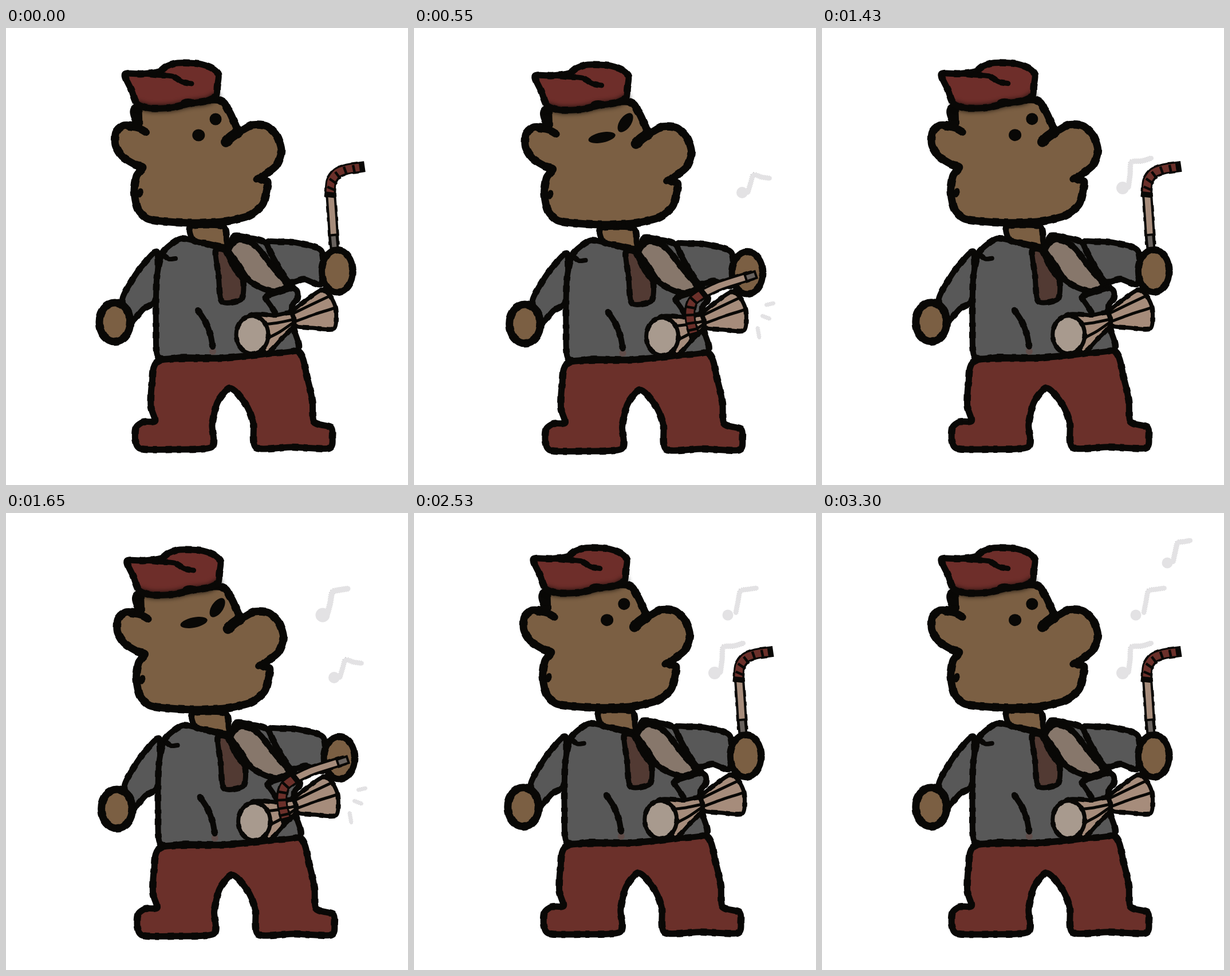
Recreate the animation shown at these times as an HTML page with a canvas. Size 702 px wide and 797 px high, loop 3.85 s.

```html
<!DOCTYPE html>
<html lang="en">
<head>
<meta charset="utf-8">
<title>Drummer</title>
<style>
  html, body { margin: 0; width: 100%; height: 100%; overflow: hidden; background: #fff; }
  canvas { display: block; }
</style>
</head>
<body>
<canvas id="stage" width="702" height="797"></canvas>
<script>
const ctx = document.getElementById('stage').getContext('2d');
const STEP = 550, STEPS = 7;
const INK = '#090806', SKIN = '#7b5f43', SHIRT = '#585858', RED = '#6b302a',
      WOOD = '#a68c7b', HIDE = '#a89a8e', STRAP = '#87776b', TIE = '#523a33', NOTE = '#e3e2e4';

// Smooth curve through "x,y x,y ..." points.
function curve(text, closed = false) {
  const pts = text.split(' ').map(p => p.split(',').map(Number));
  const n = pts.length;
  const at = i => closed ? pts[(i + n) % n] : pts[Math.max(0, Math.min(n - 1, i))];
  const path = new Path2D();
  path.moveTo(...pts[0]);
  for (let i = 0; i < (closed ? n : n - 1); i++) {
    const [a, b, c, d] = [at(i - 1), at(i), at(i + 1), at(i + 2)];
    path.bezierCurveTo(b[0] + (c[0] - a[0]) / 8, b[1] + (c[1] - a[1]) / 8,
                       c[0] - (d[0] - b[0]) / 8, c[1] - (d[1] - b[1]) / 8, c[0], c[1]);
  }
  if (closed) path.closePath();
  return path;
}

function oval(x, y, rx, ry, turn = 0) {
  const path = new Path2D();
  path.ellipse(x, y, rx, ry, turn, 0, Math.PI * 2);
  return path;
}

function line(path, width, color = INK) {
  ctx.strokeStyle = color;
  ctx.lineWidth = width;
  ctx.stroke(path);
}

// Brush line with slightly uneven edges.
function brush(path, width) {
  line(path, width);
  ctx.save();
  ctx.setLineDash([7, 15, 11, 9]);
  ctx.lineCap = 'butt';
  line(path, width + 1.6);
  ctx.restore();
}

function fill(path, color) {
  ctx.fillStyle = color;
  ctx.fill(path);
}

function shape(path, color, width) {
  fill(path, color);
  brush(path, width);
}

const leftArm = curve('264,392 240,412 220,440 203,474 214,515 240,490 262,472', true);
const leftHand = oval(190, 513, 27, 34);
const pants = curve('268,580 255,620 253,660 260,685 240,687 227,697 226,720 236,734 290,735 359,731 360,692 368,656 380,637 391,628 404,637 422,662 432,690 437,732 500,731 564,733 570,712 567,696 538,687 535,650 526,610 510,564 440,570 375,576', true);
const torso = curve('274,391 303,368 330,371 385,385 398,363 425,366 455,376 475,420 493,447 508,458 509,472 500,485 503,525 509,561 440,569 375,575 310,574 266,574 262,520 262,470 264,430', true);
const neck = curve('323,346 327,370 352,376 384,382 385,370 379,346', true);
const head = curve('230,138 229,168 205,170 192,182 191,204 203,224 225,238 239,243 228,258 224,285 230,315 248,333 285,338 335,340 385,337 425,327 448,308 455,285 457,268 445,262 472,240 481,214 473,188 455,171 430,169 408,180 399,165 388,143 365,125', true);
const hat = curve('208,81 238,80 267,76 280,67 300,61 335,62 358,69 371,81 369,102 367,118 350,127 320,132 288,139 252,140 229,132 219,108', true);
const hatBase = curve('229,134 252,140 288,139 320,132 350,128 368,118');
const rightArm = curve('456,377 480,373 510,375 551,389 551,446 520,438 492,441', true);
const rightHand = oval(578.5, 424, 27, 37);
const strap = curve('394,377 407,369 425,373 442,386 468,420 491,448 472,459 450,455 424,440 405,412 389,389', true);
const tie = curve('366,389 371,430 377,477 411,473 414,441 399,420 383,389', true);
const cone = curve('498,497 525,474 551,457 566,467 576,490 573,524 535,523 503,519', true);
const barrel = curve('425,503 470,501 498,497 503,518 482,541 452,566', true);
const drumHead = oval(430, 535, 28, 33);

const raisedStick = {
  shaft: curve('567,288 570,330 573,378'),
  tip: curve('572,367 573,378'),
  grip: curve('566,286 568,267 578,253 596,246 617,243'),
  bands: ['561,277 575,283', '565,263 578,272', '575,251 584,263', '590,242 595,256', '606,239 609,253']
};
const loweredStick = {
  shaft: curve('499,466 535,449 592,431'),
  tip: curve('585,434 591,432'),
  grip: curve('501,465 487,476 482,493 483,512 488,531'),
  bands: ['483,470 495,481', '475,486 493,489', '473,501 493,500', '475,516 495,513', '478,528 496,524']
};

function drawHead(hit) {
  shape(neck, SKIN, 10);
  shape(head, SKIN, 13);
  brush(curve('230,140 231,168'), 15);
  brush(curve('214,172 232,175 245,182'), 12);
  brush(curve('384,199 393,190 406,181'), 18);
  brush(curve('437,264 450,257 463,249'), 11);
  brush(curve('235,284 233,291'), 9);
  ctx.save();
  fill(hat, '#6e2e2a');
  ctx.shadowColor = INK;
  ctx.shadowBlur = 9;
  line(hatBase, 10);
  ctx.restore();
  brush(hat, 11);
  brush(curve('230,79 262,82 290,84 308,94 324,97'), 9);
  fill(oval(318, 130, 13, 7), INK);
  if (hit) {
    fill(oval(324.5, 188, 24, 9, -0.2), INK);
    fill(oval(365.5, 162, 10, 19, 0.6), INK);
  } else {
    fill(oval(366, 159, 10.5, 10.5), INK);
    fill(oval(336.3, 187, 11, 10.5), INK);
  }
}

function drawBody() {
  shape(leftArm, SHIRT, 10);
  shape(leftHand, SKIN, 13);
  brush(curve('200,478 213,492 216,515'), 11);
  shape(pants, RED, 11);
  shape(torso, SHIRT, 10);
  brush(curve('276,397 285,403 296,402'), 8);
  fill(oval(361, 564, 6, 6), '#604d4a');
  brush(curve('335,492 348,512 357,535 361,556'), 10);
}

function drawDrum() {
  shape(rightArm, SHIRT, 10);
  shape(tie, TIE, 9);
  shape(strap, STRAP, 10);
  brush(curve('455,467 480,459 500,453'), 10);
  brush(curve('452,470 462,484 471,498'), 9);
  shape(cone, WOOD, 7);
  shape(barrel, WOOD, 7);
  for (const rib of ['499,499 530,484 566,467', '502,513 540,499 575,488',
                     '451,517 475,514 499,509', '457,541 478,530 500,515']) {
    line(curve(rib), 5);
  }
  line(curve('497,493 502,505 504,522'), 8);
  shape(drumHead, HIDE, 7);
  shape(rightHand, SKIN, 11);
}

function drawStick({ shaft, tip, grip, bands }) {
  ctx.lineCap = 'butt';
  brush(shaft, 18);
  line(shaft, 10, WOOD);
  ctx.lineCap = 'square';
  line(tip, 16);
  line(tip, 8, '#68625e');
  brush(grip, 19);
  ctx.lineCap = 'butt';
  line(grip, 13, RED);
  for (const band of bands) line(curve(band), 4.5);
  ctx.lineCap = 'round';
}

function softLine(path, width) {
  ctx.save();
  ctx.lineCap = 'butt';
  ctx.setLineDash([1, 2]);
  line(path, width + 1.4, '#bdbcbe');
  ctx.restore();
  line(path, width, NOTE);
}

function drawNote(x, y, radius, stem, width) {
  softLine(curve(stem), width);
  fill(oval(x, y, radius, radius), NOTE);
}

function drawNotes(step) {
  if (step === 0) return;
  if (step % 2) {
    drawNote(573, 287, 10, '583,287 588,270 593,256 607,260 621,262', 7.5);
    if (step >= 3) drawNote(553, 178, 12.5, '561,176 566,158 570,138 584,134 597,132', 9);
    if (step >= 5) drawNote(602, 87, 11.5, '611,85 616,68 621,51 633,48 644,47', 9);
    for (const spark of ['615,483 628,480', '608,502 621,507', '600,523 603,540']) {
      softLine(curve(spark), 6);
    }
  } else {
    drawNote(525, 279, 11, '535,278 538,255 540,234 558,232 575,227', 8);
    if (step >= 4) drawNote(548, 178, 9.5, '562,174 566,153 570,136 584,133 598,131', 7.5);
    if (step >= 6) drawNote(603, 87, 9.5, '613,85 617,67 621,52 632,50 643,48', 8);
  }
}

function draw(time) {
  const step = Math.floor(time / STEP) % STEPS;
  const hit = step % 2 === 1;
  ctx.fillStyle = '#fff';
  ctx.fillRect(0, 0, 702, 797);
  ctx.lineCap = ctx.lineJoin = 'round';
  ctx.save();
  if (hit) ctx.translate(3.6, 3);
  else if (step) ctx.translate(0.8, -0.3);
  drawBody();
  drawHead(hit);
  drawDrum();
  if (!hit) drawStick(raisedStick);
  ctx.restore();
  if (hit) drawStick(loweredStick);
  drawNotes(step);
}

const start = performance.now();
function tick() {
  draw(performance.now() - start);
  requestAnimationFrame(tick);
}
tick();
</script>
</body>
</html>
```
